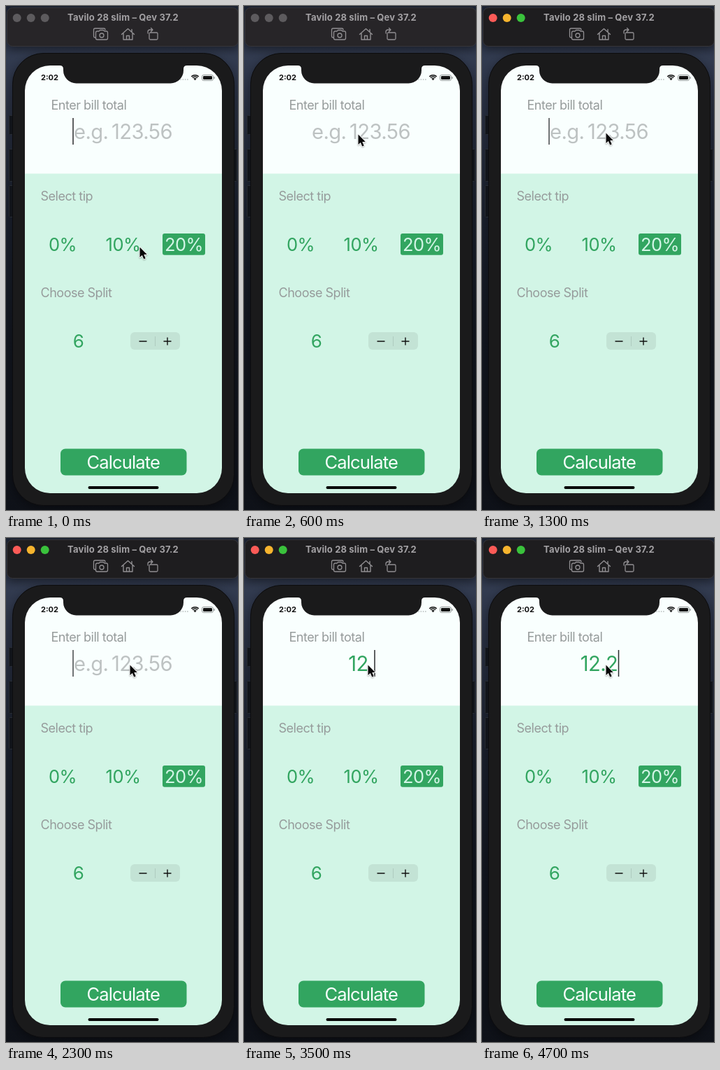
Write an HTML page with a canvas that moves like this. It is 332 by 720 pixels and loops after 5 s.

```html
<!DOCTYPE html>
<html lang="en">
<head>
<meta charset="utf-8">
<title>Tip calculator</title>
<style>
html, body { margin: 0; width: 100%; height: 100%; overflow: hidden; background: #0d111a; }
canvas { display: block; width: 332px; height: 720px; }
</style>
</head>
<body>
<canvas id="stage"></canvas>
<script>
const W = 332, H = 720, LOOP = 5000, STEP = 100;
const GREEN = '#32a560', MINT = '#d2f5e6', PAPER = '#f9fffe', LABEL = '#969b9b', BEZEL = '#1a1a1b';
const canvas = document.getElementById('stage');
const ctx = canvas.getContext('2d');
const ratio = window.devicePixelRatio || 1;
canvas.width = W * ratio;
canvas.height = H * ratio;
ctx.scale(ratio, ratio);

// Each key press restarts the caret's blink cycle.
const keys = [
  { at: -200, value: '', caret: 96 },
  { at: 2800, value: '1', caret: 175 },
  { at: 3000, value: '12', caret: 183 },
  { at: 3100, value: '12.', caret: 187 },
  { at: 4600, value: '12.2', caret: 195.5 }
];
const pointerPath = [
  { at: 0, x: 191.5, y: 344.5 },
  { at: 600, x: 163.5, y: 183.5 },
  { at: 900, x: 177.5, y: 181.5 }
];

function box(x, y, w, h, r, fill, stroke) {
  ctx.beginPath();
  ctx.roundRect(x, y, w, h, r);
  if (fill) { ctx.fillStyle = fill; ctx.fill(); }
  if (stroke) { ctx.strokeStyle = stroke; ctx.lineWidth = 1; ctx.stroke(); }
}

function disc(x, y, r, fill) {
  ctx.beginPath();
  ctx.arc(x, y, r, 0, Math.PI * 2);
  ctx.fillStyle = fill;
  ctx.fill();
}

function line(path, color, width) {
  ctx.strokeStyle = color;
  ctx.lineWidth = width;
  ctx.stroke(new Path2D(path));
}

function text(str, x, y, size, color, { align = 'center', weight = 400, spacing = -0.03, gap = 0 } = {}) {
  ctx.font = `${weight} ${size}px Inter, sans-serif`;
  ctx.letterSpacing = `${size * spacing}px`;
  ctx.wordSpacing = `${size * gap}px`;
  ctx.textAlign = align;
  ctx.fillStyle = color;
  ctx.fillText(str, x, y);
}

function withShadow(alpha, blur, drop, paint) {
  ctx.save();
  ctx.shadowColor = `rgba(0,0,0,${alpha})`;
  ctx.shadowBlur = blur * ratio;
  ctx.shadowOffsetY = drop * ratio;
  paint();
  ctx.restore();
}

function drawDesktop() {
  const sky = ctx.createLinearGradient(0, 0, 0, H);
  sky.addColorStop(0, '#1d2433');
  sky.addColorStop(0.1, '#323b50');
  sky.addColorStop(0.2, '#282f41');
  sky.addColorStop(0.4, '#1a202d');
  sky.addColorStop(0.65, '#12161f');
  sky.addColorStop(1, '#0e1118');
  ctx.fillStyle = sky;
  ctx.fillRect(0, 0, W, H);
}

function drawToolbar(active) {
  withShadow(0.45, 14, 4, () => box(1.5, 2.5, 331, 55, 8, active ? '#1e1d1f' : '#272528'));
  box(1.5, 2.5, 331, 55, 8, null, '#363539');
  const lights = active ? ['#fc5b57', '#f6b42e', '#3ac23c'] : ['#5d5b5e', '#5d5b5e', '#5d5b5e'];
  lights.forEach((color, i) => disc(15.7 + i * 20, 17, 6, color));
  text('Tavilo 28 slim – Qev 37.2', 167.5, 21, 13, '#a3a1a4', { weight: 700, spacing: 0.012 });

  const icon = '#918f92';
  ctx.lineJoin = ctx.lineCap = 'round';
  line('M128 45 H127 Q125.500 45 125.500 43 V34 Q125.500 32 127.500 32 H140 Q142 32 142 34', icon, 1.3);
  line('M130.500 36 H133 L134.500 34.500 H139.500 L141 36 H143.500 Q145.500 36 145.500 38 V46 Q145.500 48 143.500 48 H130.500 Q128.500 48 128.500 46 V38 Q128.500 36 130.500 36 Z', icon, 1.3);
  line('M140 42 a3 3 0 1 1 -6 0 a3 3 0 1 1 6 0', icon, 1.3);
  line('M165.500 40.500 L174.500 32.500 L183.500 40.500 M168 39 V48 H181 V39 M172.500 48 V42.500 H176.500 V48 M180 33.500 V37', icon, 1.4);
  line('M206 38 H215.500 Q217 38 217 39.500 V46.500 Q217 48 215.500 48 H206.500 Q205 48 205 46.500 V39 M203 39 V37 Q203 34 206 34 H210 M207.500 31.500 L210 34 L207.500 36.500', icon, 1.3);
}

function drawPhone() {
  const buttons = [[4.5, 156.5, 27], [4.5, 204.5, 46], [4.5, 256.5, 45], [324.5, 204.5, 46]];
  withShadow(0.4, 14, 4, () => box(9.5, 67.5, 317, 646, 44, BEZEL));
  for (const [x, y, h] of buttons) box(x, y, 6, h, 1, '#11141a', '#272b32');
  box(9.5, 67.5, 317, 646, 44, BEZEL, '#0c0c0e');

  ctx.save();
  ctx.beginPath();
  ctx.roundRect(27, 85, 282, 611, 36);
  ctx.clip();
  ctx.fillStyle = PAPER;
  ctx.fillRect(27, 85, 282, 155);
  ctx.fillStyle = MINT;
  ctx.fillRect(27, 239.5, 282, 458);
  ctx.restore();

  ctx.fillStyle = BEZEL;
  ctx.fill(new Path2D('M77 84 V85 Q82 85 82 90 V92 A18.500 18.500 0 0 0 100.500 110.500 H235.500 A18.500 18.500 0 0 0 254 92 V90 Q254 85 259 85 V84 Z'));
}

function drawStatus() {
  text('2:02', 50, 106, 11, '#111', { align: 'left', weight: 700, spacing: 0 });
  for (let i = 0; i < 4; i++) disc(250 + i * 3.3, 105, 0.9, '#bfc4c4');
  ctx.lineCap = 'butt';
  for (const r of [2.5, 5, 7.3]) {
    ctx.beginPath();
    ctx.arc(270.5, 106, r, -Math.PI * 0.75, -Math.PI * 0.25);
    ctx.strokeStyle = '#111';
    ctx.lineWidth = 1.6;
    ctx.stroke();
  }
  disc(270.5, 105, 1, '#111');
  box(280.5, 98.5, 16, 8, 2.3, null, '#929797');
  box(282, 100, 13, 5, 1.2, '#111');
  box(297.5, 101, 1.3, 3, 0.6, '#929797');
}

function drawForm() {
  const left = { align: 'left', spacing: -0.027 }, tight = { spacing: -0.02 };
  text('Enter bill total', 64.5, 148, 18, LABEL, left);
  text('Select tip', 49.5, 277.5, 18, LABEL, left);
  text('Choose Split', 49.5, 416, 18, LABEL, left);

  box(224, 325, 61, 30.7, 3, GREEN);
  text('0%', 81, 350, 25.5, GREEN, tight);
  text('10%', 167.5, 350, 25.5, GREEN, tight);
  text('20%', 254.5, 350, 25.5, MINT, tight);

  text('6', 103.5, 488, 26, GREEN, tight);
  box(178, 466, 71, 25, 6, '#c3e3d5');
  line('M213.500 472 V486', '#aecbbf', 1);
  line('M190.500 479 H201.500 M225.500 479 H236.500 M231 473.500 V484.500', '#111', 1.4);

  box(78, 632.5, 180.5, 38, 7, GREEN);
  text('Calculate', 167.8, 661, 25.5, PAPER, { spacing: -0.034 });
  box(117.5, 686, 101, 4, 2, '#050505');
}

function caretAlpha(elapsed) {
  const phase = (elapsed + 800) % 1000;
  if (phase < 300 || phase >= 800) return 1;
  if (phase < 400) return 0.88;
  if (phase < 500) return 0.4;
  return phase < 700 ? 0 : 0.5;
}

function drawInput(t) {
  const key = keys.filter(k => k.at <= t).pop();
  const style = { spacing: -0.02, gap: -0.1 };
  text(key.value || 'e.g. 123.56', 167.5, 190, 29.2, key.value ? GREEN : '#bdc2c2', style);
  ctx.globalAlpha = caretAlpha(t - key.at);
  ctx.fillStyle = '#2b2d2e';
  ctx.fillRect(key.caret - 0.75, 160, 1.5, 38);
  ctx.globalAlpha = 1;
}

function pointerAt(t) {
  const next = pointerPath.findIndex(p => p.at > t);
  if (next < 0) return pointerPath[pointerPath.length - 1];
  const a = pointerPath[next - 1], b = pointerPath[next];
  const u = (t - a.at) / (b.at - a.at);
  const ease = u * u * (3 - 2 * u);
  return { x: a.x + (b.x - a.x) * ease, y: a.y + (b.y - a.y) * ease };
}

function drawPointer({ x, y }) {
  const arrow = new Path2D('M0 0 V14.500 L3.300 11.500 L5.700 17 L8.200 16 L5.800 10.600 H10.300 Z');
  ctx.save();
  ctx.translate(x, y);
  ctx.lineJoin = 'round';
  ctx.strokeStyle = '#fff';
  ctx.lineWidth = 1.8;
  withShadow(0.3, 2, 1, () => ctx.stroke(arrow));
  ctx.fillStyle = '#080808';
  ctx.fill(arrow);
  ctx.restore();
}

function draw(now) {
  const t = Math.floor((now % LOOP) / STEP) * STEP;
  drawDesktop();
  drawToolbar(t >= 900);
  drawPhone();
  drawStatus();
  drawForm();
  drawInput(t);
  drawPointer(pointerAt(t));
}

let start;
function tick(now) {
  start ??= now;
  draw(now - start);
  requestAnimationFrame(tick);
}
requestAnimationFrame(tick);
</script>
</body>
</html>
```
